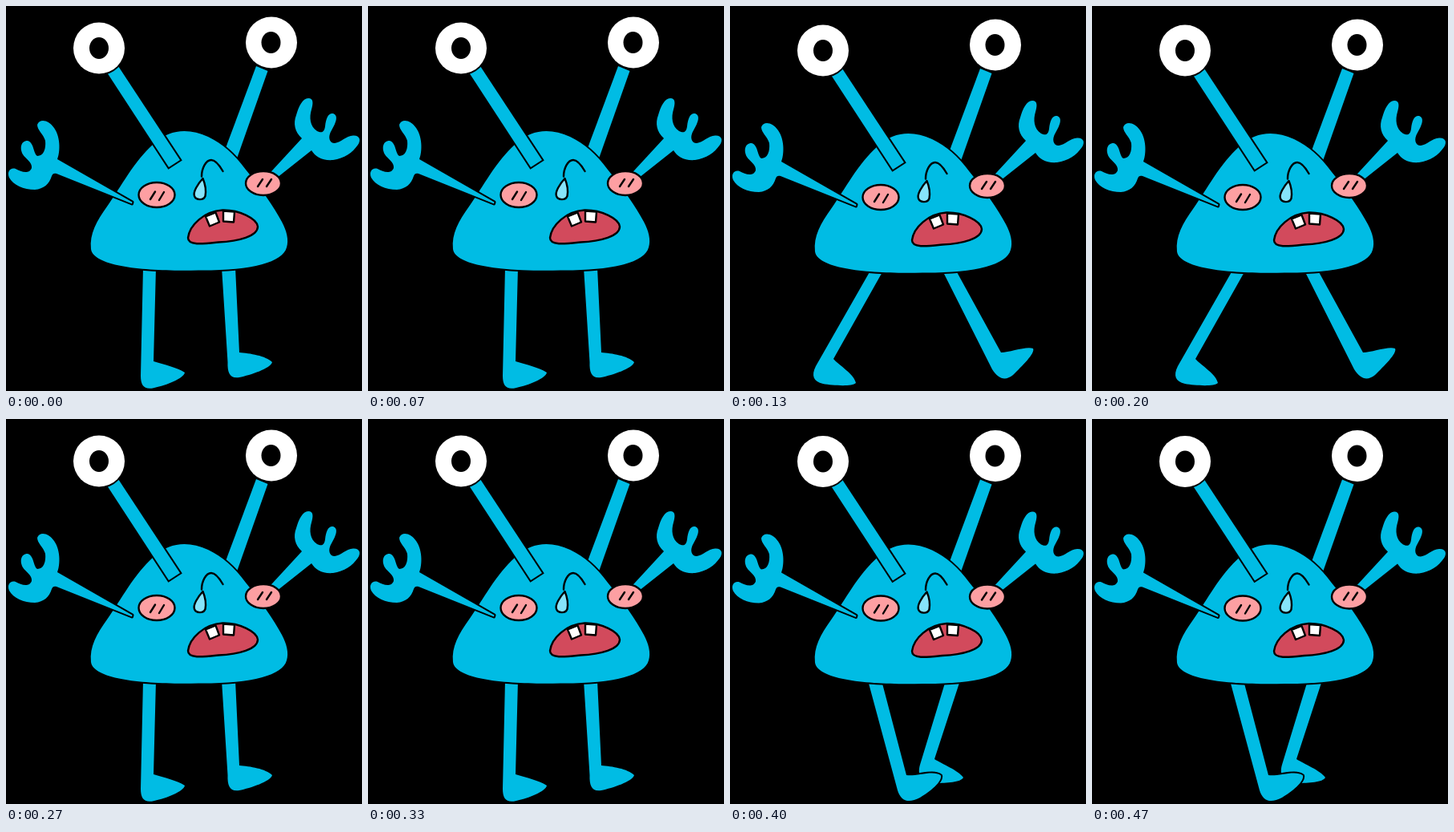
Recreate the animation shown at these times as an HTML page. Size 444 by 480 pixels, loop 0.54 s.

```html
<!DOCTYPE html>
<html lang="en">
<head>
<meta charset="utf-8">
<title>Walking blue monster</title>
<style>
  html, body { margin: 0; width: 100%; height: 100%; overflow: hidden; background: #000; }
  svg { display: block; width: 100%; height: 100%; }
  .skin, .eye { stroke: #000; stroke-width: 4; paint-order: stroke; stroke-linejoin: round; }
  .skin { fill: #00bce4; }
  .stalk { stroke-linejoin: miter; }
  .eye { fill: #fff; }
  .ink { fill: none; stroke: #000; stroke-width: 2.4; stroke-linecap: round; stroke-linejoin: round; }
  .ink .cheek { fill: #fd9fa2; }
  .ink .tear { fill: #86e4fa; }
  .ink .mouth { fill: #d24a5c; }
  .ink .tooth { fill: #fff; }
</style>
</head>
<body>
<svg viewBox="0 0 444 480">
  <path id="rightLeg" class="skin"/>
  <path id="leftLeg" class="skin"/>
  <g id="upper">
    <path class="skin stalk" d="M312 75 L326.500 81 L288 190 L271 185Z"/>
    <path class="skin" d="M106 303 C104 284 113 268 126 250 C144 225 159 194 185 171 C204 153.500 228 152 252 163 C270 171.500 284 184 299 204 C317 226 334 250 344 269 C350 280 353 292 350 301 C345 320 305 330 240 329.500 C180 331 109 326 106 303Z"/>
    <path class="skin stalk" d="M126 83 L140 75 L217 192 L203 201Z"/>

    <circle class="eye" cx="116" cy="52.500" r="32"/>
    <ellipse cx="116" cy="52.500" rx="12" ry="13.500"/>
    <circle class="eye" cx="331" cy="45.500" r="32"/>
    <ellipse cx="330.500" cy="45.500" rx="12" ry="13.500"/>

    <path class="skin" d="M64 191 C67 184 69 165 60 152 C53 142 42 140 39 148 C39 155 47 160 49 168 C50 178 47 187 39 187 C34 184 35 170 27 168 C18 168 17 178 21 185 C24 190 33 195 32 202 C29 210 19 207 12 203 C5 201 1 207 4 214 C9 223 22 229 36 229 C47 228 54 222 57 212 C58 209 60 208 63 209 L157 246.500 L157.500 244.500Z"/>
    <path class="skin" d="M369 165 C360 157 358 146 362 136 C365 125 370 115 377 115 C384 115 383 122 381 129 C378 139 379 150 388 156 C394 159 397 157 398 150 C399 140 402 133 408 134 C416 137 410 148 406 155 C401 163 403 171 410 171 C418 170 424 162 433 161.500 C441 161 443 167 439 173 C432 183 422 190 408 192 C394 193 386 188 381 180 L333 218 L321 217Z"/>

    <g class="ink">
      <ellipse class="cheek" cx="188" cy="235.500" rx="22.500" ry="15.500"/>
      <path d="M180 241 L186 231.500 M191 242 L197 232"/>
      <ellipse class="cheek" cx="321" cy="221" rx="22" ry="15"/>
      <path d="M314 225 L320 216 M325 225 L331 216"/>
      <path d="M244 212.500 C244 203 249 192 256 192 C262 192 267 200 270.500 206"/>
      <path class="tear" d="M245.500 215 C239 222 233 232 235 237 C237 242 246 243 248.500 237 C250 229 248 221 245.500 215Z"/>
      <path class="mouth" d="M227 289 C229 273 247 256 270 254.500 C291 254 313 265 314 275 C314 287 290 293.500 265 294.500 C246 296.500 227 299 227 289Z"/>
      <path class="tooth" d="M249 262.500 L261.500 257.500 L266 269.500 L254 274.500Z M271 255.500 L285 256.500 L284 269.500 L271 268.500Z"/>
    </g>
  </g>
</svg>
<script>
  const LOOP = 540;
  const standing = {
    bob: 0,
    left: "M171 326 L187 326 L184 443 C197 447 214 451 223 457 C222 464 200 473 185 476 C173 479 168 474 168 461Z",
    right: "M269 326 L286 326 L291 432 C304 433 324 436 332 444 C330 452 305 460 291 463 C279 465 276 457 276.500 444Z"
  };
  const striding = {
    bob: 3,
    left: "M175 330 L191 330 L129 440 C136 448 155 459 157 470 C152 475 128 473 116 471 C104 468 101 461 107 449Z",
    right: "M265 330 L282 330 L338 432 C349 432 369 424 378 427 C381 433 364 449 353 460 C343 468 335 465 327 453Z"
  };
  const crossing = {
    bob: 0.5,
    left: "M172 326 L189 326 L220 444 C232 446 254 437 263 444.500 C265 452 249 465 237 472 C222 480 213 476 209 463Z",
    right: "M269 326 L287 326 L255 424 C264 430 285 438 291 447 C288 453 270 454 256 454 C239 453 233 445 237 431Z"
  };
  const steps = [[0, standing], [130, striding], [270, standing], [400, crossing]];
  const [upper, leftLeg, rightLeg] =
    ["upper", "leftLeg", "rightLeg"].map(id => document.getElementById(id));

  function draw(now) {
    const time = now % LOOP;
    const pose = steps.findLast(([start]) => time >= start)[1];
    upper.setAttribute("transform", `translate(0 ${pose.bob})`);
    leftLeg.setAttribute("d", pose.left);
    rightLeg.setAttribute("d", pose.right);
  }

  const begin = performance.now();
  function tick() {
    draw(performance.now() - begin);
    requestAnimationFrame(tick);
  }
  tick();
</script>
</body>
</html>
```
